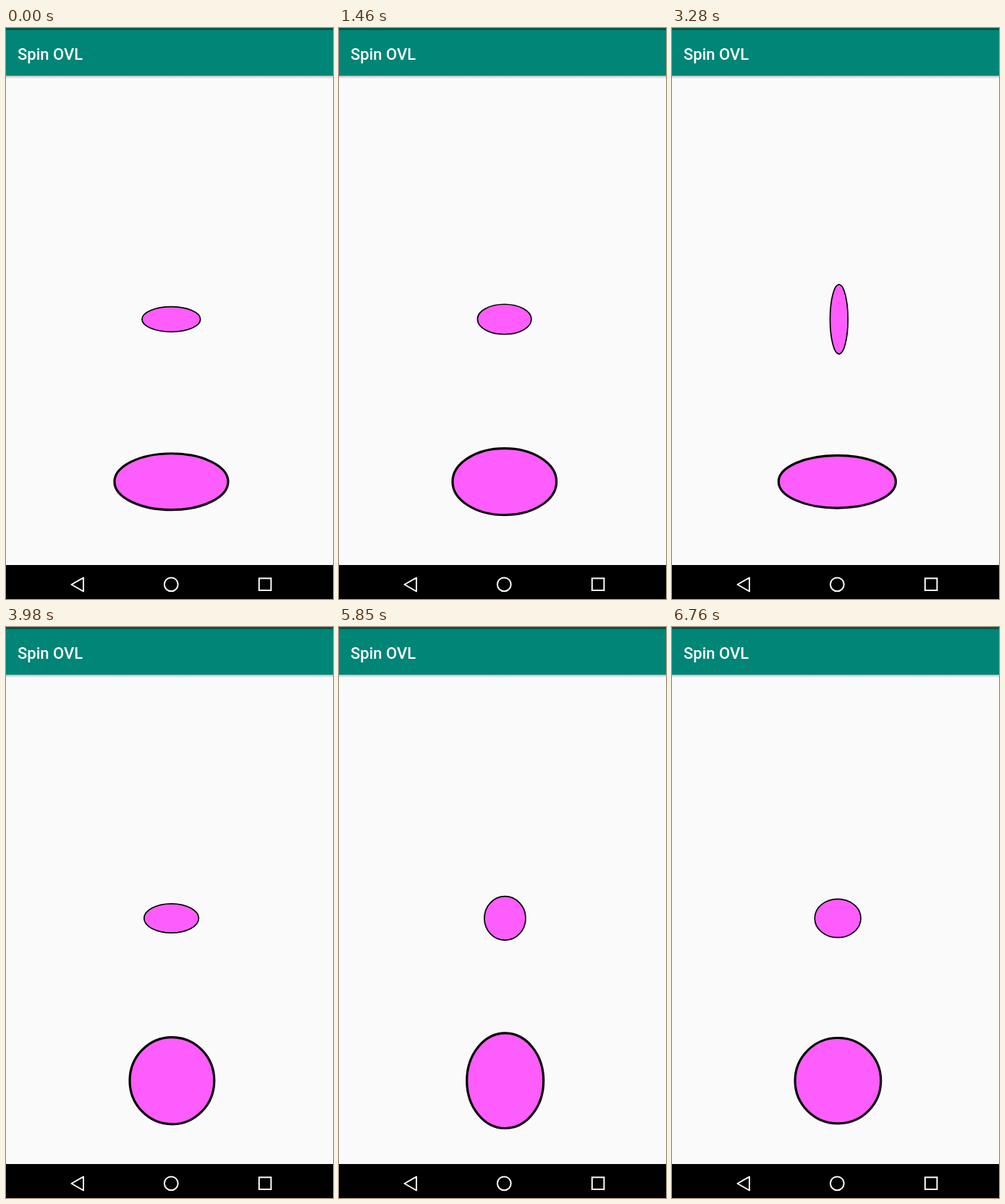
These frames come from a looping animation (452x790 px, 6.81 s). An HTML page:

```html
<!DOCTYPE html>
<html lang="en">
<head>
<meta charset="utf-8">
<title>Spin OVL</title>
<style>
  html, body { margin: 0; width: 100%; height: 100%; overflow: hidden; background: #fafafa; }
  svg { display: block; width: 100vw; height: 100vh; }
  text { font: 500 22px Roboto, "Noto Sans", sans-serif; fill: #fff; }
</style>
</head>
<body>
<svg viewBox="0 0 452 790">
  <defs>
    <linearGradient id="shade" x2="0" y2="1">
      <stop stop-color="#b8bcbc"/>
      <stop offset="1" stop-color="#fafafa"/>
    </linearGradient>
  </defs>
  <rect width="452" height="790" fill="#fafafa"/>
  <rect y="66" width="452" height="4" fill="url(#shade)"/>
  <rect width="452" height="66" fill="#008577"/>
  <rect width="452" height="3" fill="#00574b"/>
  <text x="16" y="43.5">Spin OVL</text>

  <g fill="#fd5dfc" stroke="#000">
    <ellipse id="small" cy="403" stroke-width="1.7"/>
    <ellipse id="big" cy="627.7" stroke-width="3.2"/>
  </g>

  <rect y="743" width="452" height="47" fill="#000"/>
  <g fill="none" stroke="#fff" stroke-width="2">
    <path d="M90.5 770 L107 760.5 V779.5 Z" stroke-linejoin="round"/>
    <circle cx="228.3" cy="769.8" r="9.4"/>
    <rect x="349.8" y="761.4" width="16.6" height="16.6"/>
  </g>
</svg>
<script>
const LOOP = 6810;
const STEPS = 135;
const TURN = 120.7; // degrees of the wide-tall swing per step

const big = { el: document.getElementById("big"), wide: [84, 33.2], tall: [26.6, 93.6] };
const small = { el: document.getElementById("small"), wide: [42.2, 15.3], tall: [10.8, 49.8] };

// Three plays with a rest after each; the small ellipse leads the big one by a fixed angle.
const plays = [
  { from: 2, to: 50, phase: 36, lead: -8 },
  { from: 55, to: 82, phase: -100.6, lead: 128 },
  { from: 94, to: STEPS, phase: 130, lead: 12 }
];

const clamp = (x, low, high) => Math.min(high, Math.max(low, x));
const mix = (a, b, f) => a + (b - a) * f;

function pose({ el, wide, tall }, degrees) {
  const f = (1 - Math.cos(degrees * Math.PI / 180)) / 2;
  el.setAttribute("cx", mix(228.2, 231, f));
  el.setAttribute("rx", mix(wide[0], tall[0], f));
  el.setAttribute("ry", mix(wide[1], tall[1], f));
}

function draw(time) {
  const step = Math.floor((time % LOOP + 7) / LOOP * STEPS);
  const play = plays.findLast(p => p.from <= step) || plays[0];
  const angle = play.phase + TURN * (clamp(step, play.from, play.to) - play.from);
  pose(big, angle);
  pose(small, angle + play.lead);
}

const start = performance.now();
function tick() {
  draw(performance.now() - start);
  requestAnimationFrame(tick);
}
tick();
</script>
</body>
</html>
```
